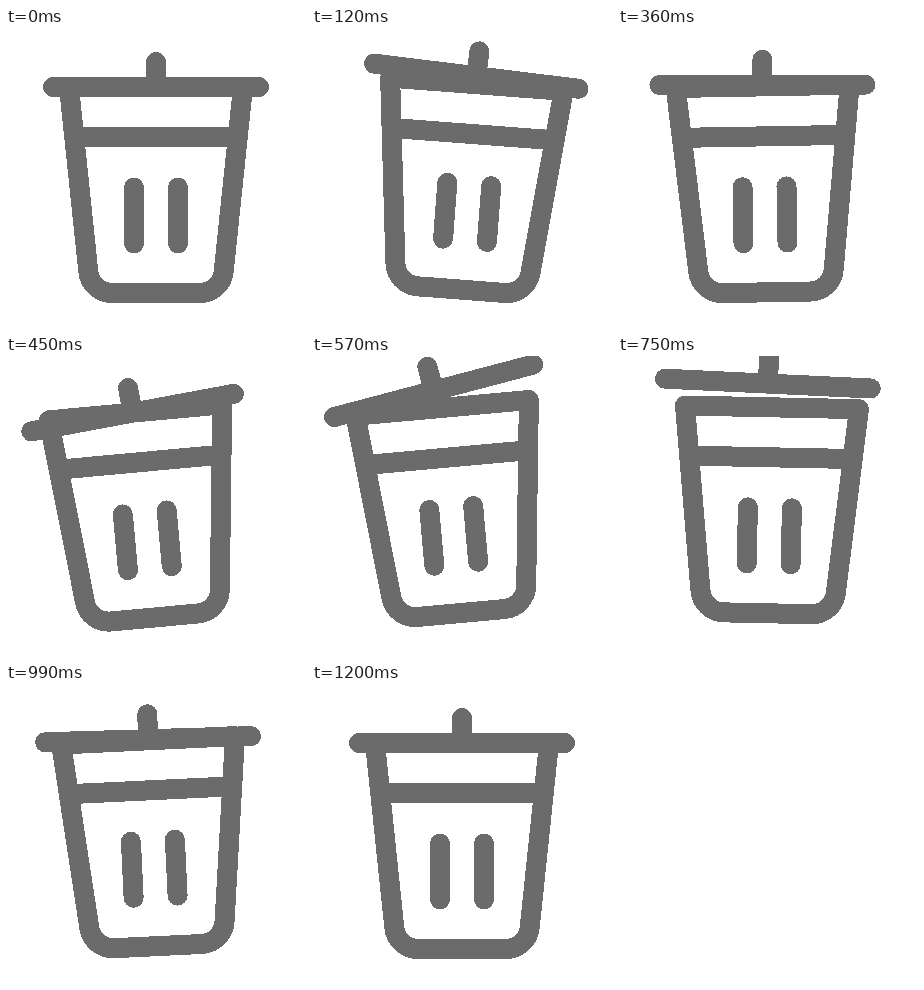
These frames come from a looping animation (300x300 px, 3230 ms). An HTML page:

```html
<!DOCTYPE html>
<html lang="en">
<head>
<meta charset="utf-8">
<title>Shaking bin</title>
<style>
  html, body { margin: 0; width: 100%; height: 100%; overflow: hidden; background: #fff; }
  svg { display: block; width: 100%; height: 100%; }
</style>
</head>
<body>
<svg viewBox="0 0 300 300" fill="none" stroke="#6b6b6b" stroke-width="20" stroke-linecap="round" stroke-linejoin="round" shape-rendering="crispEdges">
  <g id="bin">
    <path d="M63 59H237L217.7 243.5A24 24 0 0 1 193.8 265H106.2A24 24 0 0 1 82.3 243.5ZM69 109H231M128 159.5V215.5M172 159.5V215.5"/>
    <path id="lid" d="M47 59H253M150 59V34"/>
  </g>
</svg>
<script>
const LOOP = 3230, STEP = 30;
const bin = document.getElementById("bin"), lid = document.getElementById("lid");

// Half a sine wave between two times, flat elsewhere
const hop = (t, from, to, height) =>
  t > from && t < to ? height * Math.sin(Math.PI * (t - from) / (to - from)) : 0;

// Cosine easing from one turning point [time, value] to the next
function swing(t, turns) {
  const i = turns.findIndex(([time]) => time > t);
  if (i < 0) return 0;
  const [t0, a] = turns[i - 1], [t1, b] = turns[i];
  return a + (b - a) * (1 - Math.cos(Math.PI * (t - t0) / (t1 - t0))) / 2;
}

function pose(part, x, y, angle, pivotY) {
  part.setAttribute("transform", `translate(${x} ${y}) rotate(${angle} 150 ${pivotY})`);
}

const start = performance.now();
function draw() {
  const t = Math.floor((performance.now() - start) % LOOP / STEP) * STEP;

  pose(bin,
    hop(t, 0, 800, -1.6) + hop(t, 800, 1200, 2),
    hop(t, 0, 380, -4) + hop(t, 380, 930, -9) + hop(t, 900, 1200, -3.6),
    swing(t, [[0, 0], [185, 6], [500, -6], [855, 3], [1010, -3], [1200, 0]]),
    265);

  // The lid moves relative to the bin
  pose(lid,
    hop(t, 0, 380, -1.4) + hop(t, 390, 850, -7.3),
    hop(t, 0, 380, -9.5) + hop(t, 470, 900, -26.6) + hop(t, 900, 1200, -1.4),
    swing(t, [[0, 0], [240, 5.3], [570, -9.6], [780, 2.1], [1200, 0]]),
    59);

  requestAnimationFrame(draw);
}
draw();
</script>
</body>
</html>
```
